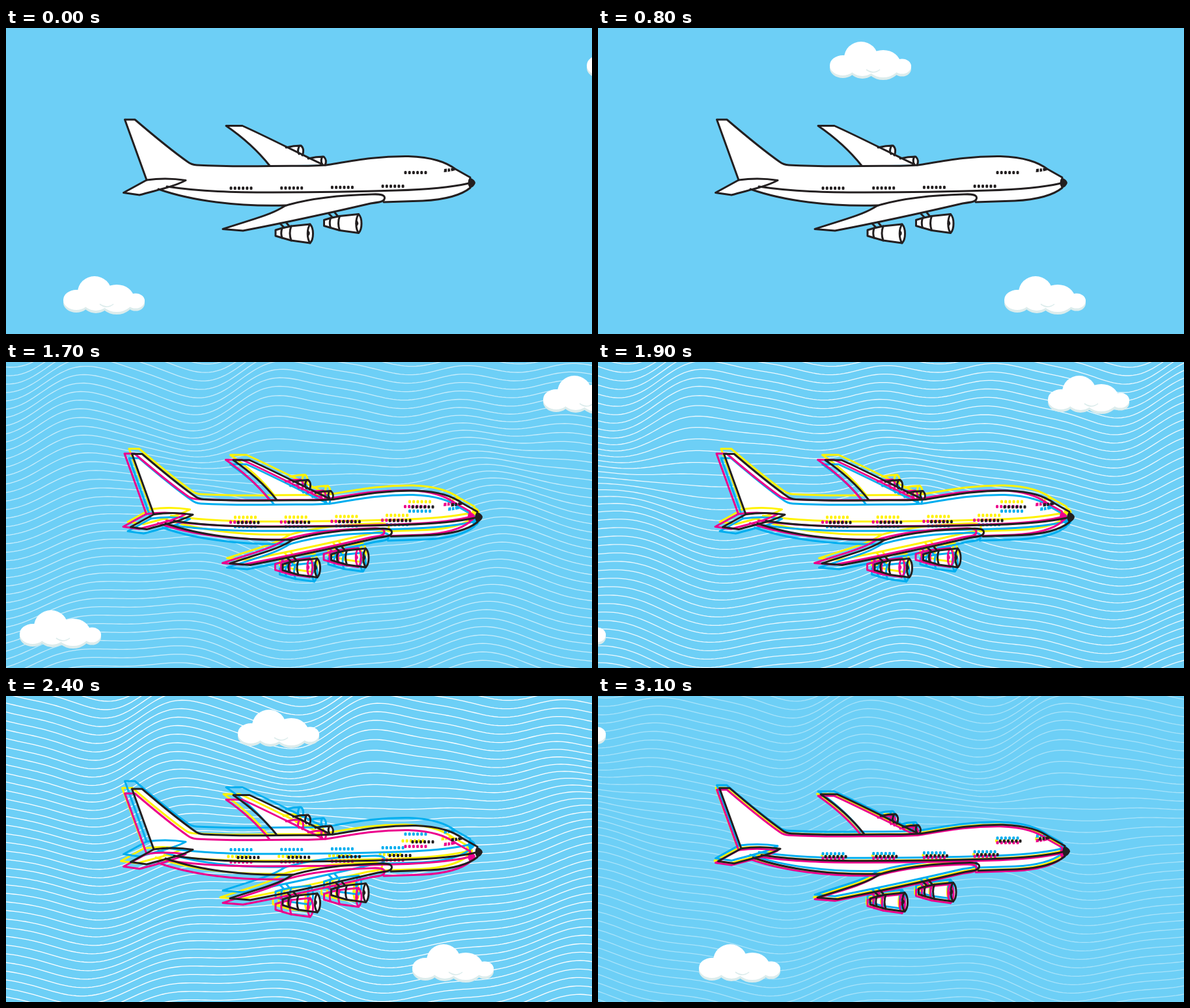
An HTML page with a canvas for the animation above (3.2 s loop, 900 by 471 pixels).

```html
<!DOCTYPE html>
<html lang="en">
<head>
<meta charset="utf-8">
<title>Airplane</title>
<style>
  html, body { margin: 0; width: 100%; height: 100%; overflow: hidden; background: #6dcff6; }
  canvas { display: block; }
</style>
</head>
<body>
<canvas id="stage" width="900" height="471"></canvas>
<script>
const ctx = document.getElementById('stage').getContext('2d');
const W = 900, H = 471, LOOP = 3200, STEP = 100;
const SKY = '#6dcff6', INK = '#231f20', CYAN = '#00aeef', PINK = '#ec008c', YELLOW = '#fff200', SHADE = '#dcecec';
const SPAN = 1072; // distance after which clouds and waves repeat

const mod = (a, n) => ((a % n) + n) % n;
const clamp = v => Math.max(0, Math.min(1, v));
const smooth = v => { const c = clamp(v); return c * c * (3 - 2 * c); };

// Draws with the origin moved to (x, y).
function at(x, y, draw) {
  ctx.save();
  ctx.translate(x, y);
  draw();
  ctx.restore();
}

// ---- clouds ----
const puffs = new Path2D();
function puff(x, y, rx, ry) {
  puffs.moveTo(x + rx, y);
  puffs.ellipse(x, y, rx, ry, 0, 0, Math.PI * 2);
}
puff(20, 36.5, 20, 15.5);
puff(48, 25, 26, 25);
puff(50, 38, 20, 15);
puff(82, 34, 26.5, 21);
puff(111, 38, 14, 11.5);
const crease = new Path2D('M56 43Q67 51 77 43');

function cloud(x, y) {
  at(x, y + 4, () => { ctx.fillStyle = SHADE; ctx.fill(puffs); });
  at(x, y, () => {
    ctx.fillStyle = '#fff';
    ctx.fill(puffs);
    ctx.strokeStyle = SHADE;
    ctx.lineWidth = 1.6;
    ctx.stroke(crease);
  });
}

function clouds(t) {
  const left = shift => mod(88 + shift - 0.67 * t + 130, SPAN) - 130;
  cloud(left(0), 382);
  cloud(left(-SPAN / 4), 21);
}

// ---- wavy lines ----
// A swell has a whole number of waves per span; it lifts the line most at its crest.
const swell = (u, waves, crest, size) => -size * Math.cos((u - crest) * waves * Math.PI * 2 / SPAN);
const upper = u => swell(u, 3, 130, 16) + swell(u, 4, 150, 12) + swell(u, 1, 560, 9) + swell(u, 7, 405, 4);
const lower = u => swell(u, 2, 755, 25) + swell(u, 5, 745, 7) + swell(u, 1, 700, 4);

function waveHeight(x, y) {
  const u = x + 16 * Math.sin(y / 60), mix = smooth((y - 60) / 200);
  return upper(u) * (1 - mix) + lower(u) * mix;
}

function waves(t) {
  const alpha = Math.min(clamp((t - 1200) / 800), clamp((3240 - t) / 340));
  if (alpha <= 0) return;
  ctx.save();
  ctx.globalAlpha = alpha;
  ctx.strokeStyle = '#fff';
  ctx.lineWidth = 1.3;
  const scroll = (t - 1700) * 1.32;
  for (let y = -51; y < H + 50; y += 13) {
    ctx.beginPath();
    for (let x = -6; x <= W + 6; x += 6) ctx.lineTo(x, y + waveHeight(x + scroll, y));
    ctx.stroke();
  }
  ctx.restore();
}

// ---- airplane ----
const path = d => new Path2D(d);
const hull = 'M216 234L182.5 141H198C226 165 255 189 279 206Q285 210.5 293 211' +
  'C330 213 370 213 405 212.5C440 212 470 213 492 211C535 204 570 197 618 197.5' +
  'C655 199 675 206 690 217L713 230';
const nearWing = 'M333 309.5L364 312C432 299 500 284 560 270C575 268 582 267 581.5 261' +
  'C581 256 573 255.5 562 256C520 257 470 262 434 272Q428 273 423 277C403 289 370 297 333 309.5Z';
const stabilizer = 'M216 234L180.5 253.5L205 257C233 249 256 245 276 234.5C254 231 234 231.5 216 234Z';
const farWing = 'M405 212C386 188 362 167 338 150.5H363C402 168 448 192 486 210';
const farEngines = 'M430 184Q442 181 453 181C458 185 457 192 455 196M451 181C448 186 448 191 450 194' +
  'M464 201Q476 198 488 198C492 202 492 207 490 211M486 198C483 203 484 207 486 210';
const belly = 'M713 246C696 260 668 264.5 640 266L580 268';
const rearBelly = 'M234 248C285 266 355 275 429 273';
const stripe = 'M247 244C300 252 350 253 410 253C480 253 540 252 600 250C655 248.5 685 245 711 239';

const solids = [farWing + 'Z', farEngines, hull + 'L713 246C696 260 668 264 640 266L580 268L429 273C355 275 285 266 234 248Z',
  stabilizer, nearWing].map(path);
const outlines = [hull, belly, rearBelly, stripe, nearWing, stabilizer, farWing, farEngines].map(path);
const engine = path('M414 311L424 308L438 305L467 302C473 308 473 325 467 331L438 327L424 323L414 320Z');
const engineLines = path('M424 308Q421.5 316 424 323M438 305Q434 316 438 327M467 302C462 309 462 324 467 331' +
  'M421 301L427 307M430 299L435 305');
const spinner = path('M464.5 311.5Q469 316 464.5 320.5Q460 316 464.5 311.5Z');
const nose = path('M712 230Q721 234 721 238.5Q719 245 712 246.5Q707 238 712 230Z');
const cockpit = path('M673 217L677 216.5V221.5L672.5 222ZM678.5 216.5L681.5 216L682.5 220.5L678.5 221.5Z' +
  'M683 216L687 215.5L690 219L684 220.5Z');

const windows = new Path2D();
function windowRow(x, y) {
  for (let i = 0; i < 6; i++) windows.roundRect(x + i * 6.2, y, 4, 5, 1.5);
}
for (let i = 0; i < 4; i++) windowRow(343.5 + 77.7 * i, 244 - i * i / 3);
windowRow(611.5, 220);

function eachEngine(draw) {
  draw();
  at(74.5, -15.5, draw);
}

function planeFill() {
  ctx.fillStyle = '#fff';
  solids.forEach(p => ctx.fill(p));
  eachEngine(() => ctx.fill(engine));
}

function planeLines(color) {
  ctx.strokeStyle = ctx.fillStyle = color;
  ctx.lineWidth = 3;
  ctx.lineJoin = ctx.lineCap = 'round';
  outlines.forEach(p => ctx.stroke(p));
  eachEngine(() => {
    ctx.stroke(engine);
    ctx.stroke(engineLines);
    ctx.fill(spinner);
  });
  [nose, cockpit, windows].forEach(p => ctx.fill(p));
}

// Where each colour plate slides to when the print is out of register.
const firstSplit = { ink: [11, 0.5], yellow: [6.5, -7.5], cyan: [6.5, 7], pink: [-0.5, 0] };
const secondSplit = { ink: [11, 2], yellow: [-4, 0.5], cyan: [0, -10], pink: [0, 9] };

function plane(t) {
  const amount = Math.min(clamp((t - 1200) / 300), clamp((3210 - t) / 300));
  const split = t < 2400 ? firstSplit : secondSplit;
  const plate = ([x, y], draw) => at(x * amount, y * amount, draw);
  plate(split.ink, planeFill);
  if (amount > 0) {
    plate(split.yellow, () => planeLines(YELLOW));
    plate(split.cyan, () => planeLines(CYAN));
    plate(split.pink, () => planeLines(PINK));
  }
  plate(split.ink, () => planeLines(INK));
}

const start = performance.now();
function frame() {
  const t = Math.floor(mod(performance.now() - start, LOOP) / STEP) * STEP;
  ctx.fillStyle = SKY;
  ctx.fillRect(0, 0, W, H);
  waves(t);
  clouds(t);
  plane(t);
  requestAnimationFrame(frame);
}
requestAnimationFrame(frame);
</script>
</body>
</html>
```
